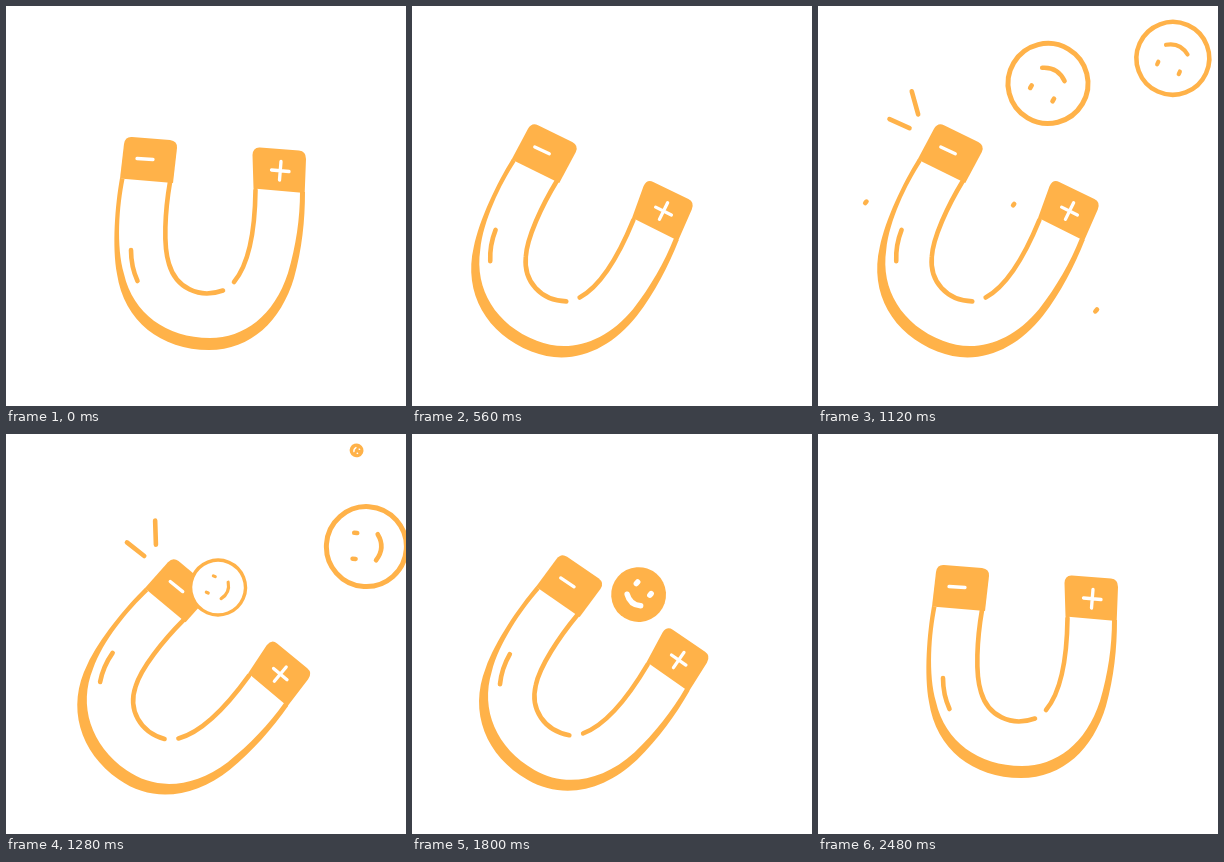
Animation, 400 px wide and 400 px high, one loop 3.16 s. Source, as an HTML page:

```html
<!DOCTYPE html>
<html lang="en">
<head>
<meta charset="utf-8">
<title>Magnet</title>
<style>
  html, body { margin: 0; width: 100%; height: 100%; overflow: hidden; background: #fff; }
  svg { display: block; width: 100%; height: 100%; }
  .line { fill: none; stroke: #ffb249; stroke-width: 4.6; stroke-linecap: round; stroke-linejoin: round; }
  .solid { fill: #ffb249; }
  .sign { fill: none; stroke: #fff; stroke-width: 3.3; stroke-linecap: round; }
  .ring { fill: #fff; stroke: #ffb249; stroke-width: 5; }
  .white { stroke: #fff; stroke-width: 8; }
</style>
</head>
<body>
<svg viewBox="0 0 400 400">
  <g id="streaks"></g>
  <g id="magnet">
    <path class="solid" d="M114 172C109 200 106 240 111 268C118 315 155 344 203 344C245 344 275 315 288 272
      C296 243 299 215 299 186L294 186C294 212 290 240 282 267C268 310 238 332 204 332
      C160 332 127 307 118 268C110 240 113 200 118.500 173Z"/>
    <path class="line" d="M164 176C159 205 157 240 163 258C170 282 193 293 217 284.500
      M228 276C243 258 249 225 249.500 184M125 244C125 255 127 265 131.500 275"/>
    <path class="solid" d="M118 138Q119 130.500 126 131L164 134Q171.500 135 171 142L167 177L114 172.500Z"/>
    <path class="solid" d="M246.500 149Q247 141 254 141.500L293 144.500Q300 145 300 153L298.700 187L247.500 182.500Z"/>
    <path class="sign" d="M131 152.500L147 153.500M265.500 164L283 165.500M275 155.500L273.500 174"/>
    <g id="sparks"></g>
  </g>
  <g id="faces"></g>
</svg>
<script>
const LOOP = 3160;
const FLIGHT = 640;
const GAP = { x: 205, y: 205 };

const byId = id => document.getElementById(id);
const clamp = (v, low = 0, high = 1) => Math.min(high, Math.max(low, v));
const mix = (a, b, u) => a + (b - a) * u;
const ramp = (t, from, to) => (1 - Math.cos(Math.PI * clamp((t - from) / (to - from)))) / 2;
const bend = (a, b, c, u) => mix(mix(a, b, u), mix(b, c, u), u);

function add(parent, tag, className) {
  const el = document.createElementNS(parent.namespaceURI, tag);
  el.setAttribute('class', className);
  return parent.appendChild(el);
}

function makeLine(id, x, y, length, degrees) {
  const angle = degrees * Math.PI / 180;
  return { el: add(byId(id), 'path', 'line'), x, y, dx: length * Math.cos(angle), dy: length * Math.sin(angle) };
}

// Shows the part of a line between fractions tail and head.
function trim({ el, x, y, dx, dy }, tail, head) {
  el.style.display = head - tail > 0.01 ? '' : 'none';
  el.setAttribute('d', `M${x + dx * tail} ${y + dy * tail}L${x + dx * head} ${y + dy * head}`);
}

const sparks = [makeLine('sparks', 98, 130.5, 24, 233), makeLine('sparks', 95, 146.5, 22, 183)];
const streaks = [
  makeLine('streaks', 82, 157, 53, 131),
  makeLine('streaks', 224, 166, 44, 131),
  makeLine('streaks', 323, 251, 71, 130)
];

// Each face flies along a curve from (x, y), bent towards (viaX, viaY), into the gap.
const faces = [
  { start: 720, x: 297, y: 52, viaX: 231, viaY: -22, turn: 4, spin: 330 },
  { start: 1000, x: 320, y: -1, viaX: 447, viaY: 149, turn: 152, spin: 277 },
  { start: 1240, x: 359, y: 16, viaX: 294, viaY: 13, turn: 94, spin: 350, filled: true }
];
for (const face of faces) {
  face.el = add(byId('faces'), 'g', 'face');
  add(face.el, 'circle', face.filled ? 'solid' : 'ring').setAttribute('r', 40);
  add(face.el, 'path', face.filled ? 'line white' : 'line')
    .setAttribute('d', 'M-13 -13v3M13 -13v3M-13 10.500Q0 19.500 13 10.500');
}

function drawMagnet(t) {
  const away = ramp(t, 120, 345) - ramp(t, 1780, 2480);
  const wave = Math.sin(Math.PI * (clamp(t, 480, 1770) - 480) / 560) ** 2;
  const angle = away * (18.1 + 17.9 * wave);
  byId('magnet').setAttribute('transform',
    `translate(${-73.7 * away} ${-1.6 * away}) rotate(${angle} 189.7 319.6)`);
}

function drawFace({ el, start, x, y, viaX, viaY, turn, spin }, t) {
  const u = clamp((t - start) / FLIGHT);
  const size = ramp(t, start, start + 150) * clamp((1 - u) / 0.18);
  el.style.display = size > 0 ? '' : 'none';
  el.setAttribute('transform',
    `translate(${bend(x, viaX, GAP.x, u)} ${bend(y, viaY, GAP.y, u)}) rotate(${turn + spin * u}) scale(${size})`);
}

function draw(t) {
  drawMagnet(t);
  sparks.forEach(s => trim(s, ramp(t, 1700, 1790), ramp(t, 660, 760)));
  streaks.forEach(s => trim(s, ramp(t, 620, 1190), ramp(t, 560, 920)));
  faces.forEach(face => drawFace(face, t));
}

const start = performance.now();
function tick() {
  draw((performance.now() - start) % LOOP);
  requestAnimationFrame(tick);
}
tick();
</script>
</body>
</html>
```
